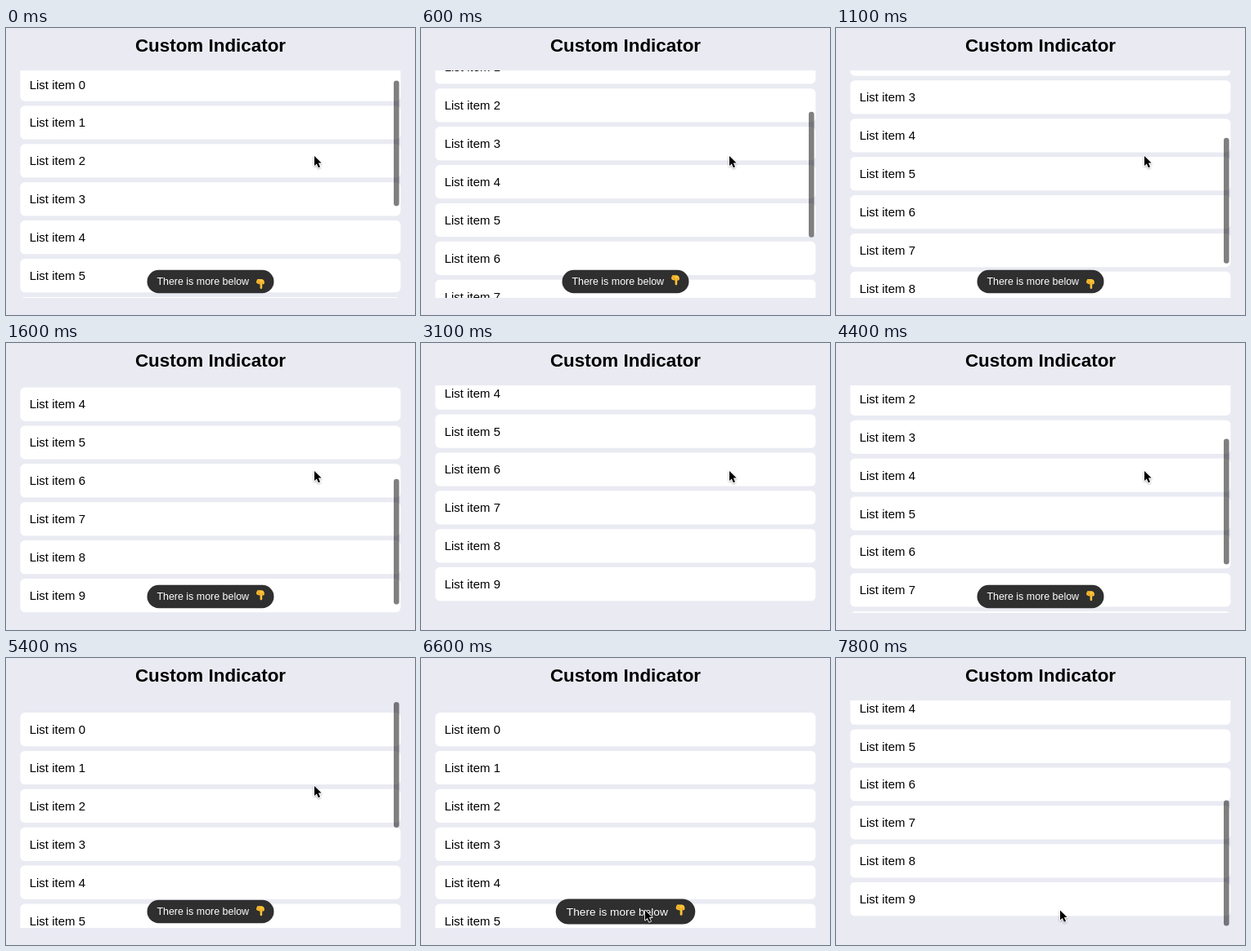
These frames come from a looping animation (500x352 px, 8 s). An HTML page:

```html
<!DOCTYPE html>
<html lang="en">
<head>
<meta charset="utf-8">
<title>Custom Indicator</title>
<style>
  html, body { margin: 0; width: 100%; height: 100%; overflow: hidden; background: #eaeaf3; }
  svg { display: block; width: 500px; height: 352px; font-family: "Liberation Sans", Arial, sans-serif; }
  h1, .title { font-size: 22.4px; font-weight: bold; text-anchor: middle; }
  #list { font-size: 15px; }
  #pill { font-size: 12.45px; transform-origin: 250px 311px; }
</style>
</head>
<body>
<svg viewBox="0 0 500 352">
  <defs>
    <clipPath id="port"><rect x="0" y="52" width="500" height="279"/></clipPath>
    <filter id="soft" x="-50%" y="-50%" width="200%" height="200%">
      <feDropShadow dx="0" dy="1" stdDeviation="1" flood-opacity=".35"/>
    </filter>
  </defs>
  <text class="title" x="250" y="29">Custom Indicator</text>
  <g clip-path="url(#port)"><g id="list"></g></g>
  <rect id="bar" x="474" width="6.6" height="154" rx="3.3" fill="#000" fill-opacity=".5"/>
  <g id="pill">
    <rect x="172.5" y="296.8" width="155" height="28.4" rx="14.2" fill="#2f2f30"/>
    <text x="184.4" y="315.3" fill="#fff">There is more below</text>
    <g id="hand">
      <path d="M307.3 303.2h5.6q2.4.4 2.9 2.8v2.4q-.5 1.2-1.7.9l-.9.2v4.5q-.2 1.2-1.3 1.2t-1.3-1.2v-4.3l-3.6-1.2q-1.3-.9-.9-2.6z" fill="#fdc436"/>
      <path d="M307.4 306.9l3.2.6v2.2M307.3 305l3 .5M313.2 306.6v2.6" fill="none" stroke="#d98218" stroke-width=".7"/>
    </g>
  </g>
  <g id="cursor" filter="url(#soft)">
    <path d="M0 0V12L2.8 9.4L4.9 14.2L7 13.3L4.9 8.6H8.6Z" stroke="#fff" stroke-width="1.6" stroke-linejoin="round" paint-order="stroke"/>
  </g>
</svg>
<script>
  const LOOP = 8000, STEP = 100, PITCH = 46.9, END = 214;
  const $ = id => document.getElementById(id);
  const [list, bar, pill, hand, cursor] = ['list', 'bar', 'pill', 'hand', 'cursor'].map($);

  list.innerHTML = Array.from({ length: 10 }, (_, i) => {
    const y = 67 + i * PITCH;
    return `<rect x="17.4" y="${y}" width="465" height="41.2" rx="5.6" fill="#fff"/>
            <text x="28.7" y="${y + 26}">List item ${i}</text>`;
  }).join('');

  const part = (t, a, b) => Math.min(1, Math.max(0, (t - a) / (b - a)));
  const ease = p => p * p * (3 - 2 * p);
  const mix = (a, b, p) => a + (b - a) * p;
  const move = (el, x, y) => el.setAttribute('transform', `translate(${x} ${y})`);

  function scrollAt(t) {
    if (t < 3500) return Math.min(END, 18.5 + t * .1135);
    if (t < 4400) return mix(END, 113, part(t, 3500, 4400));
    if (t < 7100) return mix(113, 0, part(t, 4400, 5300));
    return END * ease(part(t, 7100, 7750));
  }

  function barAt(t) {
    if (t < 3550) return 1 - part(t, 2200, 2500);
    if (t < 7150) return 1 - part(t, 5700, 6000);
    return 1;
  }

  function draw(t) {
    const s = scrollAt(t);
    move(list, 0, -s);
    bar.setAttribute('y', 54 + s * .563);
    bar.setAttribute('opacity', barAt(t));

    pill.style.display = s < 208 ? '' : 'none';
    pill.style.transform = `scale(${1 + .1 * ease(part(t, 6250, 6500))})`;
    const phase = (t / 1000 + .95) % 1;
    move(hand, 0, 5 * ease(Math.abs(1 - 2 * phase)));

    const p = ease(part(t, 5600, 6500));
    move(cursor, mix(377, 274, p), mix(157, 309.5, p));
  }

  const start = performance.now();
  function frame() {
    const t = Math.max(0, performance.now() - start) % LOOP;
    draw(Math.floor(t / STEP) * STEP);
    requestAnimationFrame(frame);
  }
  frame();
</script>
</body>
</html>
```
